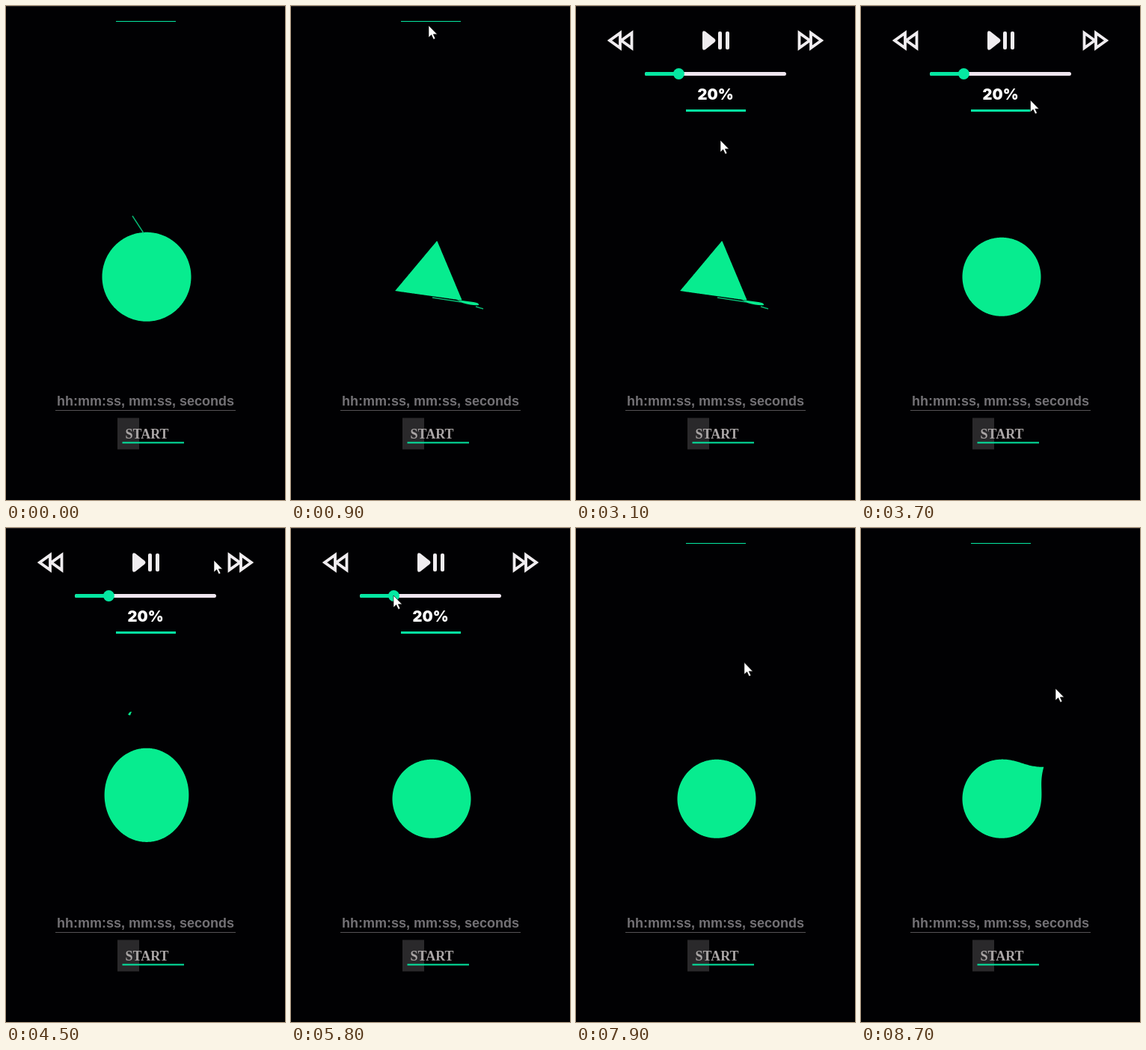
Animation of 373 by 659 pixels, one loop 8800 ms. Source, as an HTML page:

```html
<!DOCTYPE html>
<html lang="en">
<head>
<meta charset="utf-8">
<title>Timer</title>
<style>
  html, body { margin: 0; width: 100%; height: 100%; overflow: hidden; background: #010103; }
  svg { display: block; width: 373px; height: 659px; }
  .green { fill: #05e8a2; }
  .blob, .splash { fill: #07ec8f; }
  .splash > * { visibility: hidden; }
  .thread { fill: none; stroke: #07b873; stroke-width: 1.4; }
  .icon { fill: none; stroke: #f0edf0; stroke-width: 3.8; }
  .solid { fill: #f0edf0; }
  .percent { font: 900 20px Inter, sans-serif; fill: #fff; text-anchor: middle; }
  .hint { font: bold 18px "Liberation Sans", Arial, sans-serif; fill: #737175; }
  .start { font: bold 18px "Liberation Serif", Times, serif; fill: #aaa6a6; }
</style>
</head>
<body>
<svg viewBox="0 0 373 659">
  <rect width="373" height="659" fill="#010103"/>
  <path d="M0 .5H373" stroke="#222124"/>

  <path class="blob" id="blob"/>
  <g class="splash" id="splash">
    <path class="thread" data-from="0" data-to="100" stroke-width="2" d="M169 280L184 303"/>
    <path data-from="100" data-to="200" d="M163 249L165.500 245.500L168 245L166 250Z"/>
    <g data-from="200" data-to="400">
      <path d="M225 376C234 382 240 399 239 409C238 417 235 418 233 412C231 404 228 398 226 393Z"/>
      <path class="thread" d="M199 312L229 384M207 324L224 366M230 400L237 425"/>
    </g>
    <g data-from="400" data-to="800">
      <path d="M218 361C236 376 247 392 243 405C241 411 238 409 236 405Z"/>
      <path class="thread" d="M196 314L241 416M205 322L222 361"/>
    </g>
    <g data-from="800" data-to="1100">
      <path d="M222 392L244 395Q252 396 251 399Q244 400 229 396Z"/>
      <path class="thread" d="M189 389L228 395M247 401L257 404"/>
    </g>
  </g>

  <text class="hint" x="68" y="533">hh:mm:ss, mm:ss, seconds</text>
  <rect x="66" y="539" width="241" height="1" fill="#545255"/>
  <rect x="149" y="549.500" width="29" height="42" fill="#2a292b"/>
  <text class="start" x="159.500" y="576.500">START</text>
  <rect class="green" x="155.500" y="581.500" width="82.500" height="2"/>

  <g id="panel">
    <g id="controls">
      <path class="icon" id="rewind" d="M59 36V56L45 46ZM74.500 36V56L60.500 46Z"/>
      <use href="#rewind" transform="matrix(-1 0 0 1 373 0)"/>
      <path class="solid" d="M169 36Q169 32 173 34L185 43.500Q188 46 185 48.500L173 58Q169 60 169 56Z"/>
      <rect class="solid" x="190" y="34" width="5" height="24" rx="2"/>
      <rect class="solid" x="200" y="34" width="5" height="24" rx="2"/>
      <rect x="92" y="88" width="189" height="5" rx="2.500" fill="#efe6ef"/>
      <rect class="green" id="filled" x="92" y="88" height="5" rx="2.500"/>
      <circle class="green" id="thumb" cy="90.500" r="7.500"/>
      <text class="percent" id="percent" x="186.500" y="125"></text>
    </g>
    <rect class="green" id="handle" x="147" y="138" width="80"/>
  </g>

  <path id="cursor" fill="#fff" stroke="#000" stroke-width=".6"
    d="M0 0V16L3.700 12.600L6.500 18.500L9 17.400L6.300 11.800H11.500Z"/>
</svg>
<script>
const LOOP = 8800, BEAT = 2200, STEP = 100;
const $ = id => document.getElementById(id);
const show = (el, on) => el.style.visibility = on ? "visible" : "hidden";
const mix = (a, b, k) => a + (b - a) * k;

// Eased 0 to 1 between two times.
function ramp(t, from, to) {
  const k = Math.min(1, Math.max(0, (t - from) / (to - from)));
  return k * k * (3 - 2 * k);
}

const stops = [
  { at: 500, x: 192, y: 7 },
  { at: 900, x: 184, y: 26 },
  { at: 2500, x: 183, y: 21 },
  { at: 3100, x: 193, y: 179 },
  { at: 4500, x: 278, y: 43 },
  { at: 5800, x: 137, y: 90 },
  { at: 7000, x: 183, y: 138 },
  { at: 8700, x: 260, y: 214 }
];

function pointerAt(t) {
  const i = Math.max(1, stops.findIndex(stop => stop.at >= t));
  const a = stops[i - 1], b = stops[i];
  const k = ramp(t, a.at, b.at);
  return { x: mix(a.x, b.x, k), y: mix(a.y, b.y, k) };
}

// A wobbling ellipse, sliced into a triangle, then drawn out to a tip.
function blobPath(t) {
  const sliced = t >= 2 * STEP;
  const wobble = t < 460 ? 3.2 * Math.sin(2 * Math.PI * t / 460) : 0;
  const radius = sliced ? 52.5 : 59.5;
  const cx = 188, cy = 361.3 - 1.6 * Math.max(0, wobble);
  const release = ramp(t, 1000, 1500);
  const rightCut = sliced ? mix(25.4, 70, release) : 70;
  const sideCut = mix(70, 25.4, ramp(t, 400, 800) - release);
  const tip = 18 * ramp(t, 1500, 2100);
  const cuts = [[-22.8, rightCut], [98, sideCut], [220, sideCut]];

  const points = [];
  for (let deg = 0; deg < 360; deg++) {
    const a = deg * Math.PI / 180;
    let r = 1 / Math.hypot(Math.cos(a) / (radius - wobble), Math.sin(a) / (radius + wobble));
    const fromTip = Math.abs((deg + 37 + 180) % 360 - 180) * Math.PI / 180;
    r += tip * Math.exp(-fromTip / .2);
    for (const [normal, distance] of cuts) {
      const c = Math.cos(a - normal * Math.PI / 180);
      if (c > 0) r = Math.min(r, distance / c);
    }
    points.push((cx + r * Math.cos(a)).toFixed(2) + " " + (cy + r * Math.sin(a)).toFixed(2));
  }
  return "M" + points.join("L") + "Z";
}

function draw(now) {
  const t = Math.floor((now % LOOP) / STEP) * STEP;
  const beat = t % BEAT;
  $("blob").setAttribute("d", blobPath(beat));
  for (const part of $("splash").children) {
    const { from, to } = part.dataset;
    show(part, beat >= +from && beat < +to);
  }

  const open = ramp(t, 2400, 3000) - ramp(t, 7200, 7900);
  $("panel").setAttribute("transform", `translate(0 ${-118 * (1 - open)})`);
  $("handle").setAttribute("height", 1 + 2 * open);
  show($("controls"), open > 0);

  const level = mix(20, 9, ramp(t, 5900, 6400));
  const x = 99.4 + 1.9 * level;
  $("filled").setAttribute("width", x - 92);
  $("thumb").setAttribute("cx", x);
  $("percent").textContent = Math.round(level) + "%";

  const pointer = pointerAt(t);
  $("cursor").setAttribute("transform", `translate(${pointer.x} ${pointer.y})`);
  show($("cursor"), t >= stops[0].at);
}

const began = performance.now();
function tick() {
  draw(performance.now() - began);
  requestAnimationFrame(tick);
}
tick();
</script>
</body>
</html>
```
